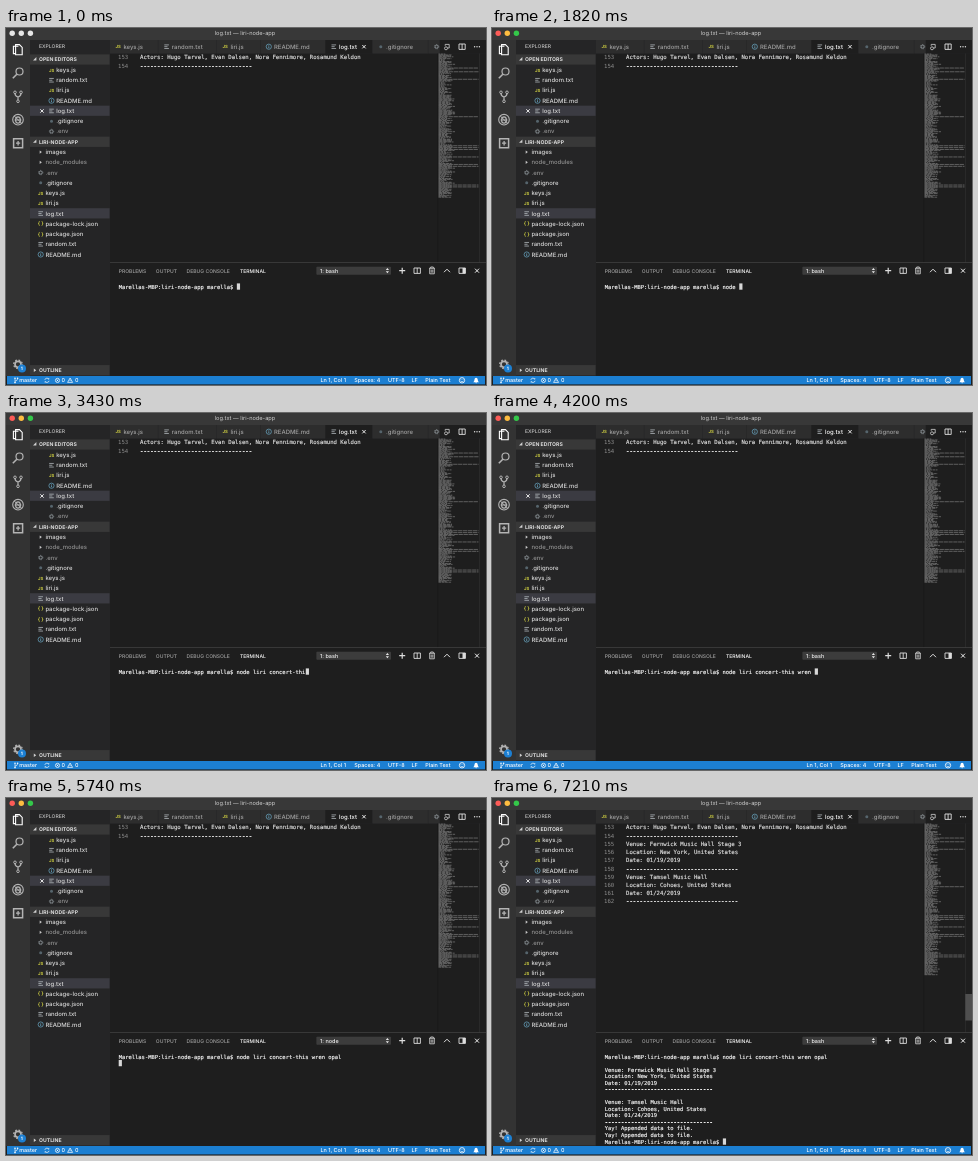
An HTML page that plays this animation: 480 px wide and 357 px high, repeating every 7.28 s.

```html
<!DOCTYPE html>
<html lang="en">
<head>
<meta charset="utf-8">
<title>Editor session</title>
<style>
html, body { margin: 0; width: 100%; height: 100%; overflow: hidden; background: #1e1e1e; }
svg { display: block; width: 480px; height: 357px; }
text { font-family: Inter, "Open Sans", sans-serif; font-size: 5.95px; font-weight: 500; fill: #d4d4d4; white-space: pre; text-rendering: geometricPrecision; }
.title { font-size: 5.65px; font-weight: 400; }
.small { font-size: 5.05px; }
.bold { font-size: 5.15px; font-weight: 700; }
.shell { font-size: 5.5px; }
.status { font-size: 5.45px; fill: #fff; }
.code { font: 5.65px "DejaVu Sans Mono", monospace; fill: #dcdcdc; stroke: #dcdcdc; stroke-width: .16; }
.term { font: 5.45px "DejaVu Sans Mono", monospace; fill: #f0f0f0; stroke: #f0f0f0; stroke-width: .18; }
.rule { stroke-width: .5; }
.num { fill: #8c8c8c; stroke: none; }
.line { fill: none; stroke: #c5c5c5; stroke-width: .8; }
</style>
</head>
<body>
<svg id="stage" viewBox="0 0 480 357" xmlns="http://www.w3.org/2000/svg"></svg>
<script>
const stage = document.getElementById('stage');

function add(tag, attrs, parent = stage) {
  const el = document.createElementNS('http://www.w3.org/2000/svg', tag);
  for (const k in attrs) el.setAttribute(k, attrs[k]);
  return parent.appendChild(el);
}
const rect = (x, y, width, height, fill, parent) => add('rect', { x, y, width, height, fill }, parent);
const dot = (cx, cy, r, fill) => add('circle', { cx, cy, r, fill });
const ring = (cx, cy, r, stroke, width) =>
  add('circle', { cx, cy, r, class: 'line', style: `stroke:${stroke};stroke-width:${width}` });
const line = (d, stroke = '#c5c5c5', width = .8) =>
  add('path', { d, class: 'line', style: `stroke:${stroke};stroke-width:${width}` });
function text(x, y, str, cls = '', fill = '', parent) {
  const el = add('text', { x, y, class: cls }, parent);
  if (fill) el.style.fill = fill;
  el.textContent = str;
  return el;
}

// File type icons, centred on x, y
const icons = {
  js: (x, y) => text(x - 2.6, y + 1.6, 'JS', 'bold', '#cbcb41').style.fontSize = '4.3px',
  json: (x, y) => text(x - 3, y + 1.7, '{ }', 'bold', '#cbcb41').style.fontSize = '5px',
  txt: (x, y) => line(`M${x - 2.3} ${y - 1.8}h4.6m-4.6 1.8h3.2m-3.2 1.8h4.6`, '#c0c8cc', .7),
  md(x, y) {
    ring(x, y, 2.6, '#6aa9c6', .7);
    line(`M${x} ${y - .4}v1.9m0-3v.6`, '#6aa9c6', .8);
  },
  git: (x, y) => dot(x, y, 1.5, '#56656d'),
  env(x, y) {
    ring(x, y, 1.5, '#8b9297', .9);
    ring(x, y, 2.2, '#8b9297', .7).style.strokeDasharray = '.9 .83';
  },
  dir: (x, y) => add('path', { d: `M${x - 1} ${y - 1.7}l2.2 1.7l-2.2 1.7z`, fill: '#c5c5c5' })
};

function cross(x, y, r = 1.7, color = '#e8e8e8') {
  line(`M${x - r} ${y - r}l${2 * r} ${2 * r}m0 ${-2 * r}l${-2 * r} ${2 * r}`, color, 1);
}

const lightColors = ['#fc5b57', '#fdbc40', '#34c84a'];
let lights;

function drawFrame() {
  rect(0, 0, 480, 357, '#1e1e1e');
  rect(0, 0, 480, 12, '#383838');
  lights = lightColors.map((c, i) => dot(6.2 + 9.1 * i, 5.2, 2.7, c));
  text(239, 7.2, 'log.txt — liri-node-app', 'title', '#cfcfcf').setAttribute('text-anchor', 'middle');
  rect(0, 12, 24, 336, '#333333');
  rect(24, 12, 80, 336, '#252526');
}

function drawActivity() {
  line('M9.4 25.6h-2v-7.4h5M9.6 16.6h3.8l2.8 2.8v7.4h-6.6z', '#fff', 1.1);
  const c = '#b4b4b4';
  ring(13.5, 43.5, 3.5, c, 1.2);
  line('M10.8 46.2l-4 4', c, 1.6);
  [[9, 64.3], [15, 64.3], [12, 73.3]].forEach(([x, y]) => ring(x, y, 1.3, c, 1));
  line('M9 65.6q0 2.6 3 3.4q3-.8 3-3.4M12 69v3', c, 1.2);
  add('ellipse', { cx: 12, cy: 92, rx: 2.4, ry: 3.2, class: 'line', style: `stroke:${c};stroke-width:1.2` });
  ring(12, 91.7, 5.3, c, 1.1);
  line('M8.3 88l7.4 7.4M8.6 92h6.8', c, 1);
  line('M7.6 110.8h9v9h-9z', c, 1.5);
  line('M10 115.2h4.2M12.1 113v4.4', c, 1.3);
  ring(12, 336.3, 3, c, 1.7);
  ring(12, 336.3, 4.3, c, 1.2).style.strokeDasharray = '1.7 1.68';
  dot(16, 340.5, 4, '#1c7fd2');
  text(14.7, 342.2, '1', 'bold', '#fff').style.fontSize = '4.6px';
}

function header(y, str, open) {
  rect(24, y - 5.1, 79.6, 10.2, '#383838');
  add('path', {
    d: open ? `M27 ${y + 1}h3.4v-3.4z` : `M27.8 ${y - 1.8}l2.4 1.8l-2.4 1.8z`, fill: '#d0d0d0'
  });
  text(33, y + 1.9, str, 'bold', '#e0e0e0');
}

function drawTree(rows, top, x) {
  rows.forEach(([icon, name, dim], i) => {
    const y = top + i * 10.24;
    if (name === 'log.txt') {
      rect(24, y - 5.3, 79.6, 10.2, '#3b3b42');
      if (x > 40) cross(36, y);
    }
    icons[icon](x, y);
    text(x + 4.7, y + 2, name, '', dim ? '#929292' : '#dadada');
  });
}

function drawSidebar() {
  text(33, 20.4, 'EXPLORER', 'small', '#c6c6c6');
  header(31.5, 'OPEN EDITORS', true);
  const git = ['git', '.gitignore'], env = ['env', '.env', 1], keys = ['js', 'keys.js'],
    rnd = ['txt', 'random.txt'], liri = ['js', 'liri.js'], md = ['md', 'README.md'], log = ['txt', 'log.txt'];
  drawTree([keys, rnd, liri, md, log, git, env], 42, 45.5);
  header(113.8, 'LIRI-NODE-APP', true);
  drawTree([['dir', 'images'], ['dir', 'node_modules', 1], env, git, keys, liri, log,
    ['json', 'package-lock.json'], ['json', 'package.json'], rnd, md], 124.1, 34.7);
  header(342.2, 'OUTLINE', false);
}

function drawTabs() {
  rect(104, 12, 376, 13.5, '#252526');
  const tabs = [['js', 'keys.js', 104], ['txt', 'random.txt', 152.4], ['js', 'liri.js', 211],
    ['md', 'README.md', 254.6], ['txt', 'log.txt', 319.6], ['git', '.gitignore', 366.6], ['env', '', 422.4]];
  tabs.forEach(([icon, name, x], i) => {
    const on = name === 'log.txt', end = i < 6 ? tabs[i + 1][2] : 434;
    rect(x, 12, end - x - .5, 13.5, on ? '#1e1e1e' : '#2d2d2d');
    icons[icon](x + 8.2, 18.7);
    text(x + 13.4, 20.6, name, '', on ? '#fff' : '#a2a2a2');
  });
  cross(358, 18.7);
  rect(434, 12, 46, 13.5, '#1e1e1e');
  ring(440, 20.3, 1.5, '#d0d0d0', .8);
  line('M439.2 17.8v-1.4h4v3.6h-1.6', '#d0d0d0', .8);
  line('M453 16h6.2v5.4h-6.2zM456.1 16v5.4', '#e0e0e0', .9);
  [468.6, 471, 473.4].forEach(x => dot(x, 18.7, .7, '#e0e0e0'));
}

const rule = '-'.repeat(33);
const ruled = (cls, s) => s === rule ? cls + ' rule' : cls;
const entry = (venue, place, date) => ['Venue: ' + venue, `Location: ${place}, United States`, 'Date: ' + date, rule];
const first = entry('Fernwick Music Hall Stage 3', 'New York', '01/19/2019');
const second = entry('Tamsel Music Hall', 'Cohoes', '01/24/2019');

function codeLine(i, str, parent) {
  const y = 31.4 + i * 8.23;
  text(112, y, 153 + i, 'code num', '', parent);
  text(134, y, str, ruled('code', str), '', parent);
}

// Tiny text rows of the overview, seeded by row number
function overview(from, to, parent) {
  const rand = n => { const v = Math.sin(n * 91.7) * 4373.1; return v - Math.floor(v); };
  for (let i = from; i < to; i++) {
    const r = rand(i + 1);
    const w = i % 4 === 1 ? 13 : r > .9 ? 40 : 5 + r * 13;
    add('path', {
      d: `M432.5 ${(26 + i * .936).toFixed(2)}h${w.toFixed(1)}`, class: 'line',
      style: `stroke:#c8c8c8;stroke-width:.55;stroke-opacity:.7;stroke-dasharray:${(1.5 + r * 3).toFixed(1)} .6`
    }, parent);
  }
}

function drawPanel() {
  rect(104, 234.3, 376, .6, '#4a4a4a');
  [['PROBLEMS', 112.7], ['OUTPUT', 149.8], ['DEBUG CONSOLE', 180.6], ['TERMINAL', 234]].forEach(([s, x]) =>
    text(x, 244.5, s, 'small', s === 'TERMINAL' ? '#fff' : '#a4a4a4'));
  add('rect', { x: 310.4, y: 238.8, width: 74.6, height: 8, fill: '#3c3c3c', rx: .8 });
  add('path', { d: 'M379.8 242l1.6-2.1l1.6 2.1zM379.8 243.2l1.6 2.1l1.6-2.1z', fill: '#e8e8e8' });
  line('M393.2 242.7h6M396.2 239.7v6', '#ddd', 1.2);
  line('M408 240h6.4v5.4h-6.4zM411.2 240v5.4', '#ddd', .9);
  line('M423 240.3h6M424.7 240v-1h2.6v1M423.7 240.5v5.3h4.6v-5.3M425.2 241.5v3.2M426.8 241.5v3.2', '#ddd', .8);
  line('M438 244.2l3-3l3 3', '#ddd', 1);
  line('M453 240h6.4v5.4h-6.4z', '#ddd', .9);
  rect(456.5, 240, 2.9, 5.4, '#ddd');
  cross(471, 242.7, 2, '#eee');
}

function drawStatus() {
  rect(1, 348, 478, 8.4, '#1c7fd2');
  line('M9 350.8v3.4M11.6 350.8q0 1.8-2.6 2.4', '#fff', .6);
  [[9, 350.3], [9, 354.6], [11.6, 350.3]].forEach(([x, y]) => dot(x, y, .8, '#fff'));
  line('M38.8 351.8a2.2 2.2 0 0 1 4-.5v-1.2M43.1 352.8a2.2 2.2 0 0 1-4 .6v1.2', '#fff', .7);
  ring(51.5, 352.4, 2.1, '#fff', .7);
  cross(51.5, 352.4, .8, '#fff');
  line('M61.6 354.4l2.5-4.4l2.5 4.4zM64.1 351.6v1.5', '#fff', .7);
  [['master', 13.2], ['0', 55.6], ['0', 69], ['Ln 1, Col 1', 314.5], ['Spaces: 4', 348.3],
    ['UTF-8', 382], ['LF', 405.5], ['Plain Text', 419.3]].forEach(([s, x]) => text(x, 354.4, s, 'status'));
  ring(456, 352.3, 2.7, '#fff', .8);
  line('M454.5 352.9q1.5 1.8 3 0M455 351.1v.7M457 351.1v.7', '#fff', .6);
  add('path', { d: 'M467.3 354.2q1.2-1 1.2-2.6q.1-1.8 1.6-1.8t1.6 1.8q0 1.6 1.2 2.6zM469.3 354.6h1.6l-.8.9z', fill: '#fff' });
}

drawFrame();
drawActivity();
drawSidebar();
drawTabs();
codeLine(0, 'Actors: Hugo Tarvel, Evan Dalsen, Nora Fennimore, Rosamund Keldon');
codeLine(1, rule);
rect(431.6, 25.5, .5, 209, '#161616');
overview(0, 154);
rect(473, 25.5, .5, 209, '#343434');
const appended = add('g', {});
[...first, ...second].forEach((s, i) => codeLine(i + 2, s, appended));
overview(154, 162, appended);
const thumb = rect(473.3, 196, 6.7, 26.5, '#4f4f4f');
drawPanel();
drawStatus();

const termX = 112.7, termY = 260.5, pitch = 6.54, advance = 3.282;
const row = (i, s, parent) => text(termX, termY + i * pitch, s, ruled('term', s), '', parent);
const prompt = 'Marellas-MBP:liri-node-app marella$ ';
const command = 'node liri concert-this wren opal';
const shell = text(314, 244.6, '', 'shell', '#f0f0f0');
const input = row(0, '');
const output = add('g', {});
['', ...first, '', ...second, 'Yay! Appended data to file.', 'Yay! Appended data to file.']
  .forEach((s, i) => s && row(i + 1, s, output));
const lastPrompt = row(13, prompt);
const cursor = rect(0, 0, 3.2, 6.3, '#d8d8d8');

// Keystroke times in 70 ms ticks
const keys = [19, 20, 22, 23, 25, 27, 29, 30, 32, 33, 35, 36, 37, 39, 40, 41,
  43, 45, 47, 48, 49, 51, 52, 54, 56, 57, 58, 60, 61, 62, 64, 65];
const show = (el, on) => el.setAttribute('visibility', on ? 'visible' : 'hidden');

function render(t) {
  const tick = Math.floor(t / 70);
  const typed = keys.filter(k => k <= tick).length;
  const sent = t >= 4970, printed = t >= 6160, done = t >= 6650;
  lights.forEach((el, i) => el.setAttribute('fill', tick ? lightColors[i] : '#e6e6e6'));
  input.textContent = prompt + command.slice(0, typed);
  shell.textContent = t >= 5110 && !done ? '1: node' : '1: bash';
  show(output, printed);
  show(lastPrompt, done);
  show(appended, t >= 7000);
  thumb.setAttribute('opacity', Math.max(0, Math.min(1, (tick - 99) / 4)));
  const col = done ? prompt.length : sent ? 0 : prompt.length + typed;
  const line = printed ? 13 : sent ? 1 : 0;
  cursor.setAttribute('x', termX + col * advance);
  cursor.setAttribute('y', termY - 5.1 + line * pitch);
}

const start = performance.now();
function loop() {
  render((performance.now() - start) % 7280);
  requestAnimationFrame(loop);
}
loop();
</script>
</body>
</html>
```
